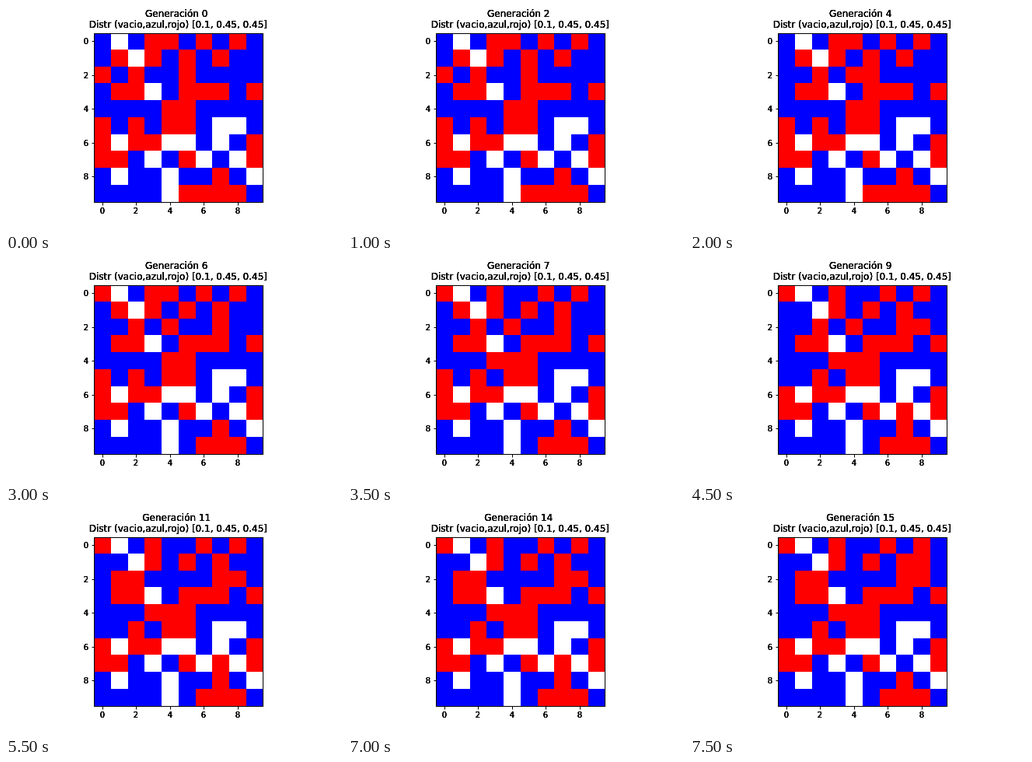
An HTML page with a canvas for the animation above (8 s loop, 432 px wide and 288 px high).

```html
<!DOCTYPE html>
<html lang="es">
<head>
<meta charset="utf-8">
<title>Generaciones</title>
<style>
html, body { margin: 0; width: 100%; height: 100%; overflow: hidden; background: #fff; }
canvas { display: block; }
</style>
</head>
<body>
<canvas id="stage" width="432" height="288"></canvas>
<script>
const ctx = document.getElementById('stage').getContext('2d');
const STEP = 500, COUNT = 16, CELL = 21.744;
const COLORS = { B: '#00f', R: '#f00', W: '#fff' };
const START = [
  'BWBRRBRBRB',
  'BRWRBRBRBB',
  'RBRBBRBBBB',
  'BRRWBRRRBR',
  'BBBBRRBBBB',
  'RBRBRRBWWB',
  'RWRRWWBWBR',
  'RRBWBRWBWR',
  'BWBBWBBRBW',
  'BBBBWRRRRB'
];
// generation: [row, column] pairs whose colours swap
const SWAPS = {
  4: [[2, 0], [2, 4]],
  5: [[9, 5], [2, 7]],
  6: [[0, 0], [2, 5]],
  7: [[0, 4], [4, 3]],
  8: [[1, 1], [7, 7]],
  9: [[5, 0], [2, 8]],
  10: [[2, 1], [2, 4]],
  15: [[7, 7], [1, 8]]
};

const edgeX = i => Math.min(330, Math.ceil(112.68 + CELL * i));
const edgeY = i => Math.max(35, Math.floor(34.56 + CELL * i));

function gridAt(gen) {
  const grid = START.map(row => [...row]);
  for (let g = 1; g <= gen; g++) {
    if (!SWAPS[g]) continue;
    const [[r, c], [s, d]] = SWAPS[g];
    [grid[r][c], grid[s][d]] = [grid[s][d], grid[r][c]];
  }
  return grid;
}

// Overlaid passes give the dense, dark lettering
function text(str, x, y, size, align) {
  ctx.font = `${size}px "DejaVu Sans", sans-serif`;
  ctx.textAlign = align;
  for (let i = 0; i < 4; i++) ctx.fillText(str, x, y);
}

function drawAxes() {
  ctx.fillStyle = ctx.strokeStyle = '#000';
  ctx.lineWidth = 1;
  ctx.strokeRect(113.5, 35.5, 217, 217);
  for (let i = 0; i < 10; i += 2) {
    const x = Math.round(112.68 + CELL * (i + 0.5));
    const y = Math.round(34.56 + CELL * (i + 0.5));
    ctx.fillRect(x, 253, 1, 3.5);
    ctx.fillRect(110.5, y, 3, 1);
    text(i, x, 267, 10, 'center');
    text(i, 106, y + 4, 10, 'right');
  }
}

function draw(gen) {
  ctx.fillStyle = '#fff';
  ctx.fillRect(0, 0, 432, 288);
  gridAt(gen).forEach((row, r) => row.forEach((cell, c) => {
    const x = edgeX(c), y = edgeY(r);
    ctx.fillStyle = COLORS[cell];
    ctx.fillRect(x, y, edgeX(c + 1) - x, edgeY(r + 1) - y);
  }));
  drawAxes();
  text(`Generación ${gen}`, 219.2, 14, 12, 'center');
  text('Distr (vacio,azul,rojo) [0.1, 0.45, 0.45]', 221.4, 28, 12, 'center');
}

let shown = -1;
function tick() {
  const gen = Math.floor(performance.now() / STEP) % COUNT;
  if (gen !== shown) draw(shown = gen);
  requestAnimationFrame(tick);
}
tick();
</script>
</body>
</html>
```
